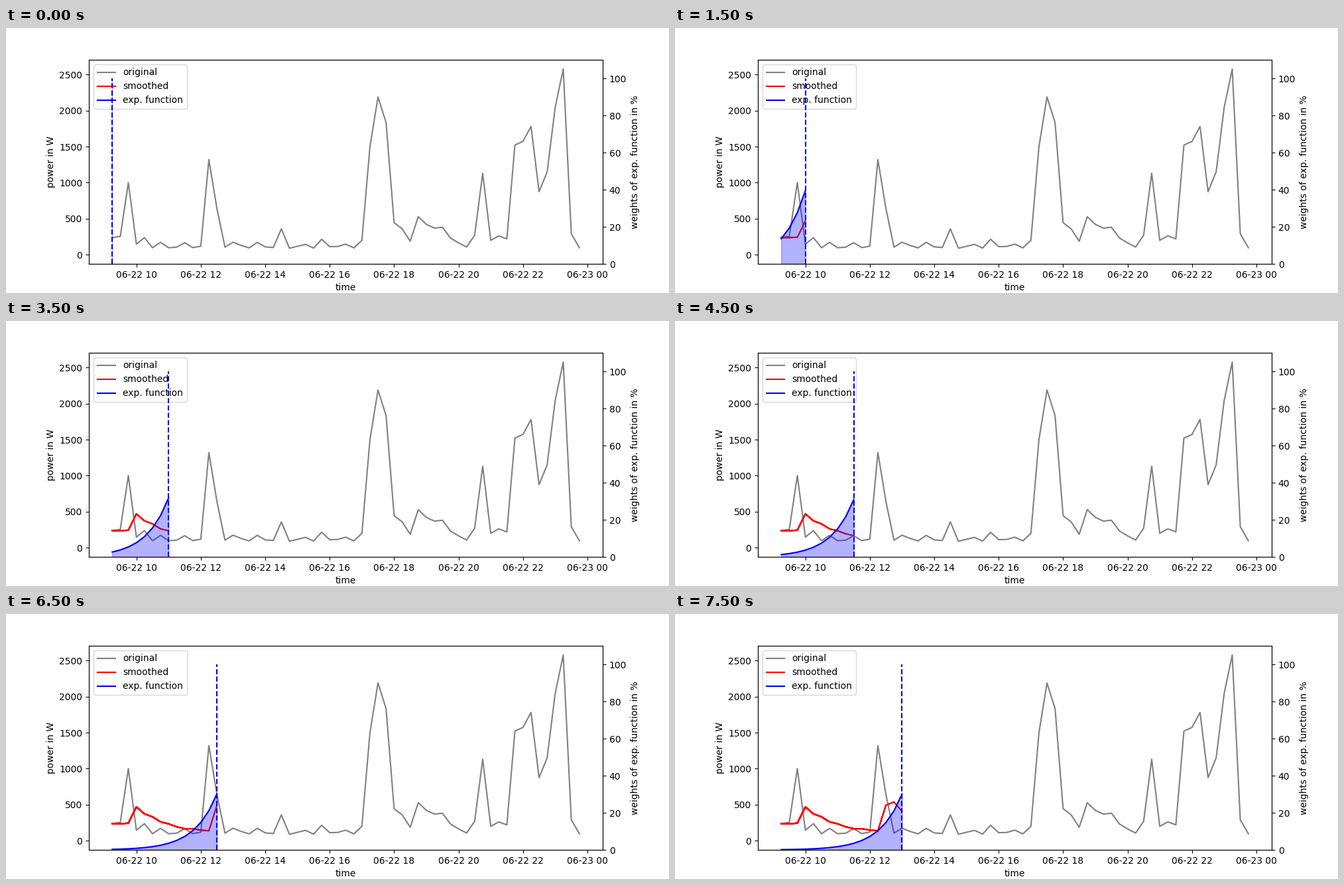
Write a matplotlib script that moves like this. It is 1000 px wide and 400 px high and loops after 8000 ms.

```python
import matplotlib.pyplot as plt
import numpy as np
from matplotlib.animation import ArtistAnimation
from matplotlib.lines import Line2D

plt.rcParams["font.family"] = "DejaVu Sans"

STEPS = 16
STEP_MS = 500
ALPHA = 0.3

# Power readings in W, one per quarter hour from 09:15
power = np.array([
    236, 252, 1000, 145, 235, 95, 170, 95, 103, 165, 97, 117, 1320, 640, 103,
    172, 127, 93, 170, 107, 98, 357, 88, 115, 142, 90, 213, 110, 113, 145,
    93, 197, 1500, 2190, 1835, 443, 358, 185, 527, 420, 368, 380, 230, 163,
    105, 268, 1130, 198, 260, 218, 1522, 1572, 1780, 875, 1148, 2045, 2578,
    290, 95])
hours = 9.25 + 0.25 * np.arange(len(power))


def smooth(values):
    """Exponential smoothing, each value predicted from the ones before it."""
    out = [float(values[0])]
    for v in values[:-1]:
        out.append(ALPHA * v + (1 - ALPHA) * out[-1])
    return np.array(out)


def weights(n):
    """Normalised exponential weights in percent, newest last."""
    w = (1 - ALPHA) ** np.arange(n)[::-1]
    return 100 * w / w.sum()


fig, ax = plt.subplots(figsize=(10, 4), dpi=100)
ax.plot(hours, power, color="grey")
ax.set_xlabel("time")
ax.set_ylabel("power in W")
ax2 = ax.twinx()
ax2.set_ylabel("weights of exp. function in %")

smoothed = smooth(power)
trails, scenes = [], []
for n in range(1, STEPS + 1):
    x, w = hours[:n], weights(n)
    # Overlaid trails make the older part of the red curve look bolder
    trails += ax.plot(x, smoothed[:n], color="red")
    curve, = ax2.plot(x, w, color="blue")
    area = ax2.fill_between(x, w, color="blue", alpha=0.3)
    marker = ax2.vlines(x[-1], 0, 100, color="blue", linestyle="dashed")
    scenes.append(trails + [curve, area, marker])

pad = 0.05 * (hours[-1] - hours[0])
ax.set_xlim(hours[0] - pad, hours[-1] + pad)
ax.set_ylim(-0.05 * power.max(), 1.05 * power.max())
ax2.set_ylim(0, 110)

ticks = range(10, 25, 2)
ax.set_xticks(ticks, [f"06-{22 + h // 24} {h % 24:02d}" for h in ticks])
ax.set_yticks(range(0, 2501, 500))
ax2.set_yticks(range(0, 101, 20))

entries = {"original": "grey", "smoothed": "red", "exp. function": "blue"}
ax.legend([Line2D([], [], color=c) for c in entries.values()],
          list(entries), loc="upper left")

anim = ArtistAnimation(fig, scenes, interval=STEP_MS, repeat=True,
                       repeat_delay=0, blit=False)
plt.show()
```
